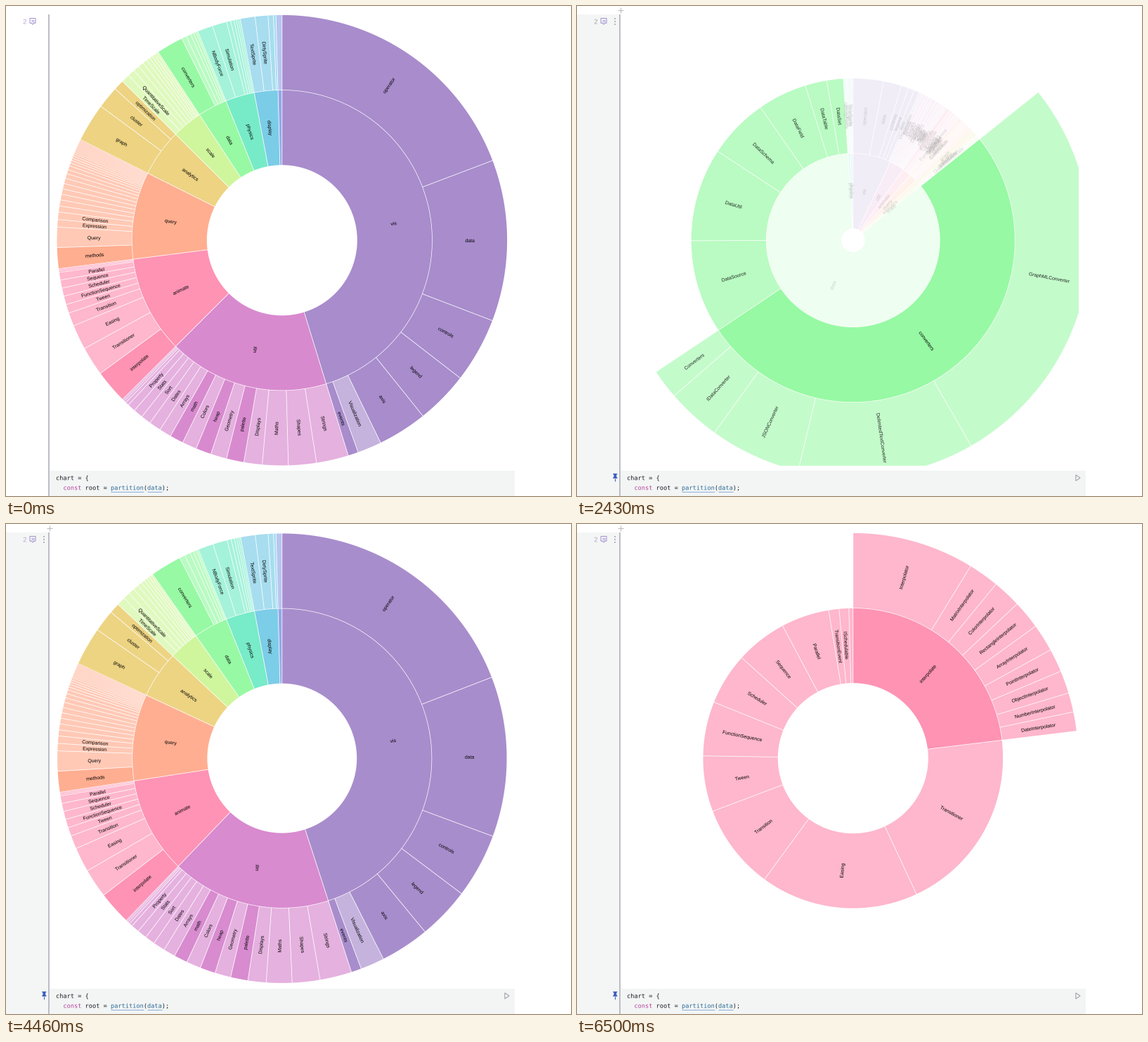
Animation of 804x697 px, one loop 7.71 s. Source, as a matplotlib script:

```python
import math

import numpy as np
import matplotlib.pyplot as plt
from matplotlib.animation import FuncAnimation
from matplotlib.collections import PathCollection, PolyCollection
from matplotlib.patches import Circle, PathPatch, Polygon, Rectangle
from matplotlib.textpath import TextPath
from matplotlib.transforms import Affine2D

W, H, DPI = 804, 697, 64
LOOP, STEP = 7710, 30
CX, CY, R = 392.8, 333.2, 107
UNIT = 642 / 932            # chart pixels per view box unit
TAU = 2 * math.pi
ZOOM_MS = 750

# Groups are lower case, leaves are capitalised.
TREE = {
    "vis": dict(operator=183967, data=110583, controls=44639, legend=36003,
                axis=33886, Visualization=16540, events=7011),
    "util": dict(Strings=22026, Shapes=19118, Maths=17705, Displays=12555,
                 palette=11946, Geometry=10993, heap=10587, Colors=10001,
                 math=9346, Arrays=8258, Dates=8217, Sort=6887, Stats=6557,
                 Property=5559, Filter=2324, Orientation=1486,
                 IValueProxy=874, IPredicate=383, IEvaluable=335),
    "animate": dict(
        interpolate=dict(Interpolator=8746, MatrixInterpolator=2202,
                         ColorInterpolator=2047, RectangleInterpolator=2042,
                         ArrayInterpolator=1983, PointInterpolator=1675,
                         ObjectInterpolator=1629, NumberInterpolator=1382,
                         DateInterpolator=1375),
        Transitioner=19975, Easing=17010, Transition=9201, Tween=6006,
        FunctionSequence=5842, Scheduler=5593, Sequence=5534, Parallel=5176,
        TransitionEvent=1116, ISchedulable=1041, Pause=449),
    "query": dict(methods=14326, Query=13896, Expression=5130, Comparison=5103,
                  DateUtil=4141, StringUtil=4130, Arithmetic=3891, Match=3748,
                  CompositeExpression=3677, ExpressionIterator=3617, Fn=3240,
                  BinaryExpression=2893, If=2732, IsA=2039, Variance=1876,
                  AggregateExpression=1616, Range=1594, Not=1554, Literal=1214,
                  Variable=1124, Xor=1101, And=1027, Or=970, Distinct=933,
                  Average=891, Maximum=843, Minimum=843, Sum=791, Count=781),
    "analytics": dict(graph=26435, cluster=15207, optimization=7074),
    "scale": dict(TimeScale=5833, QuantitativeScale=4839, Scale=4268,
                  OrdinalScale=3770, LogScale=3151, QuantileScale=2435,
                  IScaleMap=2105, ScaleType=1821, RootScale=1756,
                  LinearScale=1316),
    "data": dict(
        converters=dict(GraphMLConverter=9800, DelimitedTextConverter=4294,
                        JSONConverter=2220, IDataConverter=1314,
                        Converters=721),
        DataSource=3331, DataUtil=3322, DataSchema=2165, DataField=1759,
        DataTable=772, DataSet=586),
    "physics": dict(NBodyForce=10498, Simulation=9983, Particle=2822,
                    Spring=2213, SpringForce=1681, GravityForce=1336,
                    DragForce=1082, IForce=319),
    "display": dict(TextSprite=10066, DirtySprite=8833, RectSprite=3623,
                    LineSprite=1732),
    "flex": dict(FlareVis=4116),
}


def total(v):
    return sum(map(total, v.values())) if isinstance(v, dict) else v


def rainbow(t):
    """Cubehelix rainbow as RGB in 0..1."""
    d = abs(t - 0.5)
    h = math.radians(360 * t + 20)
    s, l = 1.5 - 1.5 * d, 0.8 - 0.9 * d
    a, c, n = s * l * (1 - l), math.cos(h), math.sin(h)
    rgb = (l + a * (-0.14861 * c + 1.78277 * n),
           l + a * (-0.29227 * c - 0.90649 * n),
           l + a * 1.97294 * c)
    return tuple(min(1, max(0, v)) for v in rgb)


def layout(tree, x=0.0, depth=1, color=None):
    nodes = []
    ranked = sorted(tree.items(), key=lambda kv: -total(kv[1]))
    for i, (name, v) in enumerate(ranked):
        w = total(v) / SUM
        c = color or rainbow(i / 10)
        nodes.append((name, depth, x, x + w, c))
        if isinstance(v, dict):
            nodes += layout(v, x, depth + 1, c)
        x += w
    return nodes


SUM = total(TREE)
NODES = layout(TREE)
ROOT = ("root", 0, 0.0, 1.0, None)
TOP = {n[0]: n for n in NODES if n[1] == 1}
CLICKS = [(1935, TOP["data"]), (3793, ROOT), (5605, TOP["animate"])]

# The screen is refreshed only at these times.
TICKS = [0, 1010, 1210, 1420, 1620, 1830, 2030, 2230, 2430, 2640, 2850,
         3260, 3470, 3660, 3860, 4060, 4260, 4460, 4680,
         5080, 5280, 5480, 5680, 5900, 6080, 6300, 6500]

# Pointer trips: start, press, gone, from, to, hand on arrival.
TRIPS = [(1010, 1830, 2230, (95, 470), (323, 187), True),
         (3260, 3660, 4060, (177, 430), (386, 338), False),
         (5080, 5480, 5900, (120, 520), (252, 398), True)]


def pose(node, focus):
    """x0, x1, y0, y1, fill alpha and label alpha once zoomed on focus."""
    name, depth, a, b, _ = node
    _, fd, fa, fb, _ = focus
    x0, x1 = (min(1, max(0, (x - fa) / (fb - fa))) * TAU for x in (a, b))
    y0, y1 = max(0, depth - fd), max(0, depth + 1 - fd)
    shown = y1 <= 3 and y0 >= 1 and x1 - x0 > 1e-6
    fill = (0.6 if name[0].islower() else 0.4) * shown
    label = float(shown and (y1 - y0) * (x1 - x0) > 0.03)
    return np.array([x0, x1, y0, y1, fill, label])


POSES = {f[0]: [pose(n, f) for n in NODES]
         for f in [ROOT] + [c[1] for c in CLICKS]}


def ease(u):
    u = min(1, max(0, u))
    return 4 * u ** 3 if u < 0.5 else 1 - 4 * (1 - u) ** 3


def rim(a0, a1, r):
    """One curved side of an arc, with parallel padding."""
    if r < 1e-6:
        return np.array([[CX, CY]])
    pad = min((a1 - a0) / 2, 0.005)
    p = math.asin(min(1, 1.5 * R / r * math.sin(pad / 2)))
    if a1 - a0 <= 2 * p:
        p = (a1 - a0) / 2
    a = np.linspace(a0 + p, a1 - p, 2 + int((a1 - a0) / 0.02))
    return np.column_stack([CX + r * np.sin(a), CY - r * np.cos(a)])


def wedge(x0, x1, y0, y1):
    inner = y0 * R
    outer = max(inner, y1 * R - UNIT)
    return np.vstack([rim(x0, x1, outer), rim(x0, x1, inner)[::-1]])


def glyphs(s, size, family):
    return TextPath((0, 0), s, size=size, prop={"family": family})


LABEL = 10 * UNIT
WORDS = [glyphs(n[0], LABEL, "Liberation Sans") for n in NODES]
MIDS = [(w.get_extents().x0 + w.get_extents().x1) / 2 for w in WORDS]


def place(i, x0, x1, y0, y1):
    a, r = (x0 + x1) / 2, (y0 + y1) / 2 * R
    turn = a - math.pi / 2 + (0 if a < math.pi else math.pi)
    move = (Affine2D().translate(-MIDS[i], -0.35 * LABEL).scale(1, -1)
            .rotate(turn).translate(CX + r * math.sin(a), CY - r * math.cos(a)))
    return WORDS[i].transformed(move)


def scene(t):
    """Arc outlines and labels, each with its colours, at time t."""
    old = new = ROOT
    k = 1
    for start, focus in CLICKS:
        if t >= start:
            old, new, k = new, focus, ease((t - start) / ZOOM_MS)
    shapes, fills, words, inks = [], [], [], []
    for i, (p, q) in enumerate(zip(POSES[old[0]], POSES[new[0]])):
        *box, fill, ink = p + (q - p) * k
        if fill > 0.003:
            shapes.append(wedge(*box))
            fills.append((*NODES[i][4], fill))
        if ink > 0.003:
            words.append(place(i, *box))
            inks.append((0, 0, 0, ink))
    return shapes, fills, words, inks


SCENES = {t: scene(t) for t in TICKS}

fig = plt.figure(figsize=(W / DPI, H / DPI), dpi=DPI, facecolor="white")
ax = fig.add_axes([0, 0, 1, 1])
ax.set_xlim(0, W)
ax.set_ylim(H, 0)
ax.axis("off")


def px(n):
    return n * 72 / DPI


def rect(x, y, w, h, color):
    return ax.add_patch(Rectangle((x, y), w, h, fc=color, ec="none"))


def poly(points, fill, edge="none", lw=0.0, z=1):
    return ax.add_patch(Polygon(points, fc=fill, ec=edge, lw=px(lw), zorder=z))


def line(xs, ys, color, lw=1.0, style="-"):
    return ax.plot(xs, ys, color=color, lw=px(lw), ls=style,
                   solid_capstyle="butt")[0]


def text(s, x, y, size, color, family="DejaVu Sans Mono"):
    path = glyphs(s, size, family).transformed(
        Affine2D().scale(1, -1).translate(x, y))
    return ax.add_patch(PathPatch(path, fc=color, ec="none", zorder=2))


# Notebook page
gutter = rect(0, 12, 61, H - 12, "#f4f6f5")
rect(62, 661, 662, H - 661, "#f3f5f5")
rect(60.4, 12, 1.6, H - 12, "#bdbdc6")

CHAR = 5.2


def code(s, col, y, color):
    text(s, 71 + col * CHAR, y, CHAR / 0.602, color)


code("chart", 0, 674.3, "#1b1e23")
code("= {", 6, 674.3, "#1b1e23")
code("const", 2, 688.3, "#b5429a")
code("root =", 8, 688.3, "#1b1e23")
code("partition", 15, 688.3, "#2b6a94")
code("(", 24, 688.3, "#1b1e23")
code("data", 25, 688.3, "#2b6a94")
code(");", 29, 688.3, "#1b1e23")
for col, n in ((15, 9), (25, 4)):
    line([71 + col * CHAR, 71 + (col + n) * CHAR], [690.6] * 2, "#7fa8d8", 0.9)

# Comment counter
LILAC, GREY = "#b5a6d8", "#a3a3ae"
count = text("2", 24.2, 25.4, 9.6, LILAC, "Liberation Sans")
poly([(34, 17.5), (42, 17.5), (42, 24.3), (39.6, 24.3), (38, 26.2),
      (36.4, 24.3), (34, 24.3)], "none", "#a08fd0", 1)
for y in (20, 22):
    line([36, 40], [y, y], "#a08fd0", 0.9)

# Tools shown while the cell is hovered
PIN = "#3f5fc0"
tools = [
    line([57.5, 65.5], [6, 6], "#b9b9c0"),
    line([61.5, 61.5], [2, 10], "#b9b9c0"),
    poly([(51.3, 665), (57.3, 665), (57.3, 666.4), (56.2, 666.4),
          (56.2, 669.5), (57.8, 672), (50.8, 672), (52.4, 669.5),
          (52.4, 666.4), (51.3, 666.4)], PIN),
    line([54.3, 54.3], [672, 676], PIN, 1.1),
    poly([(709.8, 667), (709.8, 675.4), (716, 671.2)], "none", "#9a9aa5", 1),
]
tools += [ax.add_patch(Circle((54, y), 0.95, fc="#9a9aa5", ec="none"))
          for y in (18, 22, 26)]

# Chart
arcs = PolyCollection([], linewidths=0, edgecolors="none", zorder=3)
labels = PathCollection([], linewidths=0, edgecolors="none", zorder=4)
for group in (arcs, labels):
    ax.add_collection(group, autolim=False)
    group.set_clip_path(Rectangle((CX - 3 * R, CY - 3 * R), 6 * R, 6 * R,
                                  transform=ax.transData))

# Pointer
ARROW = np.array([(0, 0), (0, 14), (3.2, 11.1), (5.5, 16), (7.8, 15),
                  (5.6, 10.3), (9.8, 10.1)])
HAND = np.array([(0.5, -0.5), (-1, 0.6), (-1, 11), (-3, 9), (-4.2, 9.6),
                 (-4, 11.5), (0.5, 17.5), (0.8, 20), (8.8, 20), (9, 17.5),
                 (10.8, 13.5), (10.8, 8.4), (9.5, 7.3), (8, 7.8), (7, 6.4),
                 (5.2, 7), (4, 5.6), (2.2, 6), (2.2, 0.6)])
glow = ax.add_patch(Circle((0, 0), 10, fc=(0.84, 0.94, 0.2, 0.85),
                           ec="none", zorder=5))
pointer = poly(ARROW, "white", "#1a1a1a", 1.1, 6)


def move_pointer(t):
    pointer.set_visible(False)
    glow.set_visible(False)
    for start, press, gone, a, b, hand in TRIPS:
        if start <= t < gone:
            u = min(1, (t - start) / (press - start))
            at = np.array(a) + (np.array(b) - np.array(a)) * u
            over = R < math.hypot(at[0] - CX, at[1] - CY) < 2 * R
            pointer.set_xy((HAND if hand and over else ARROW) + at)
            pointer.set_visible(True)
            glow.center = tuple(at)
            glow.set_visible(t == press)


def draw(i):
    now = i * STEP + 20
    t = max(k for k in TICKS if k <= now)
    shapes, fills, words, inks = SCENES[t]
    arcs.set_verts(shapes)
    arcs.set_facecolor(fills)
    labels.set_paths(words)
    labels.set_facecolor(inks)
    for part in tools:
        part.set_visible(t >= 1010)
    gutter.set_visible(t >= 2230)
    count.set_facecolor(GREY if 2230 <= t < 4460 else LILAC)
    move_pointer(t)
    return []


anim = FuncAnimation(fig, draw, frames=LOOP // STEP, interval=STEP,
                     init_func=lambda: draw(0), repeat=True, repeat_delay=0)
plt.show()
```
